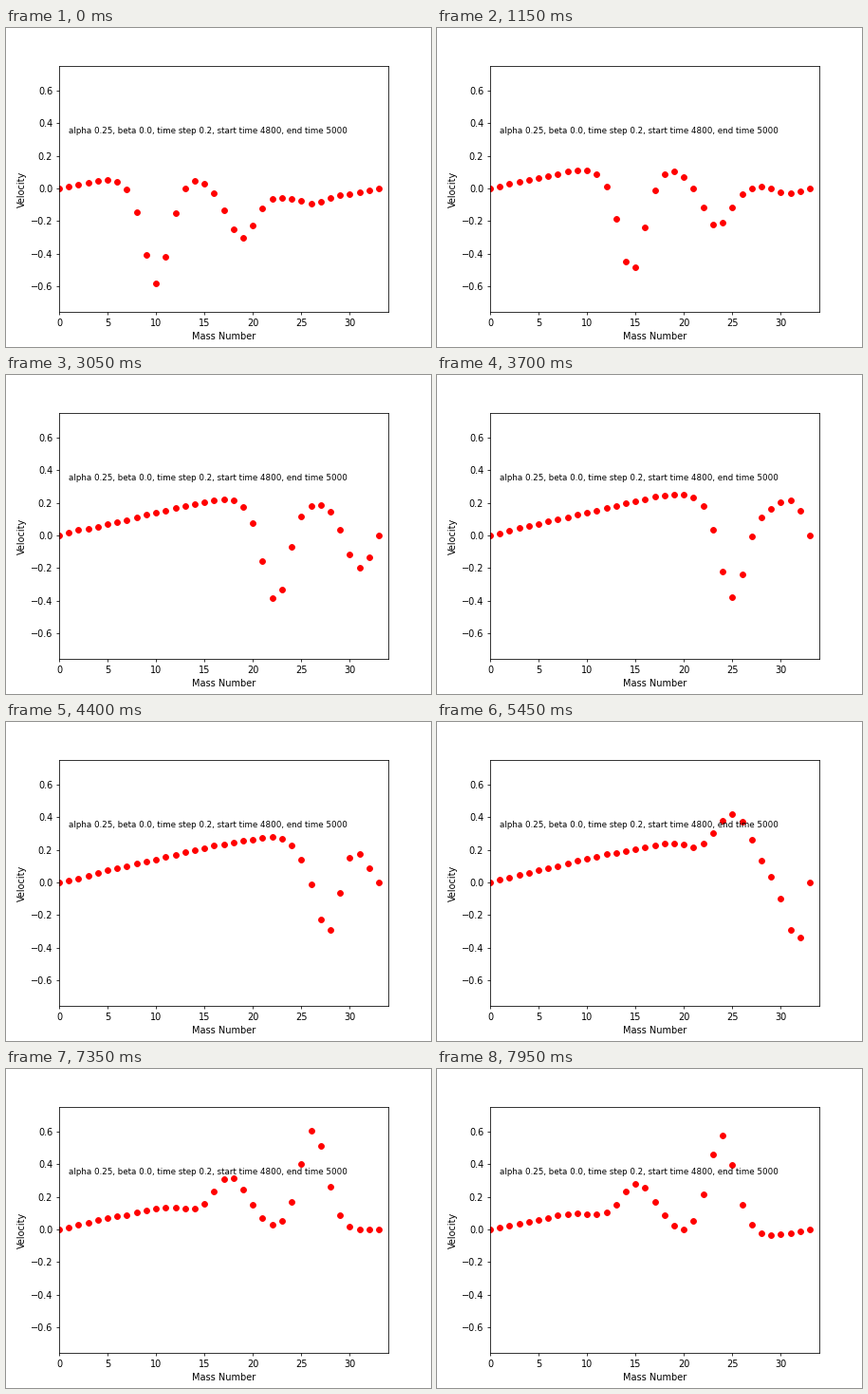
Animation of 448 by 336 pixels, one loop 8 s. Source, as a matplotlib script:

```python
import numpy as np
import matplotlib.pyplot as plt
from matplotlib.animation import FuncAnimation

ALPHA = 0.25      # quadratic coupling of the springs
STEP = 0.2        # model time per frame
SUBSTEPS = 2
FRAMES = 160
INTERVAL = 50
MASSES = 34
RAMP = 0.014      # growth of the spring stretch along the chain

# Slow part of the starting velocity, as (mass, velocity) key points
BASE = [(0, 0), (8, 0.1), (13.5, 0.105), (17, 0.045), (20.5, 0.052),
        (23.5, -0.03), (30, -0.03), (33, 0)]
# Solitary waves on top of it: height, centre, width
WAVES = [(-0.685, 10.02, 1.82), (-0.35, 18.9, 2.2), (-0.06, 26.2, 1.8)]


def start_velocity(n):
    v = np.interp(n, *zip(*BASE))
    for height, centre, width in WAVES:
        v = v + height / np.cosh((n - centre) / width) ** 2
    return v


def start_state():
    """Waves running to the right: stretch mirrors velocity, plus a ramp."""
    v = start_velocity(np.arange(MASSES))
    v[[0, -1]] = 0
    link = np.arange(MASSES - 1) + 0.5
    mean_v = (start_velocity(link - 0.3) + start_velocity(link + 0.3)) / 2
    stretch = RAMP * link - mean_v
    x = np.concatenate([[0], np.cumsum(stretch - stretch.mean())])
    return x, v


def accel(x):
    stretch = np.diff(x)
    acc = np.zeros_like(x)
    acc[1:-1] = np.diff(stretch + ALPHA * stretch**2)
    return acc


def simulate():
    """Velocities of all masses, one row per frame (velocity Verlet)."""
    x, v = start_state()
    dt = STEP / SUBSTEPS
    acc = accel(x)
    rows = [v.copy()]
    for _ in range(FRAMES - 1):
        for _ in range(SUBSTEPS):
            v += acc * dt / 2
            x += v * dt
            acc = accel(x)
            v += acc * dt / 2
        rows.append(v.copy())
    return rows


velocity = simulate()

fig, ax = plt.subplots(figsize=(6.4, 4.8), dpi=70)
ax.set_xlim(0, 34)
ax.set_ylim(-0.757, 0.75)
ax.set_xlabel("Mass Number")
ax.set_ylabel("Velocity")
ax.text(1, 0.34, "alpha 0.25, beta 0.0, time step 0.2, "
        "start time 4800, end time 5000", fontsize=9)
dots, = ax.plot(np.arange(MASSES), velocity[0], "ro")


def draw(frame):
    dots.set_ydata(velocity[frame])
    return dots,


anim = FuncAnimation(fig, draw, frames=FRAMES, interval=INTERVAL,
                     repeat=True, repeat_delay=0)
plt.show()
```
